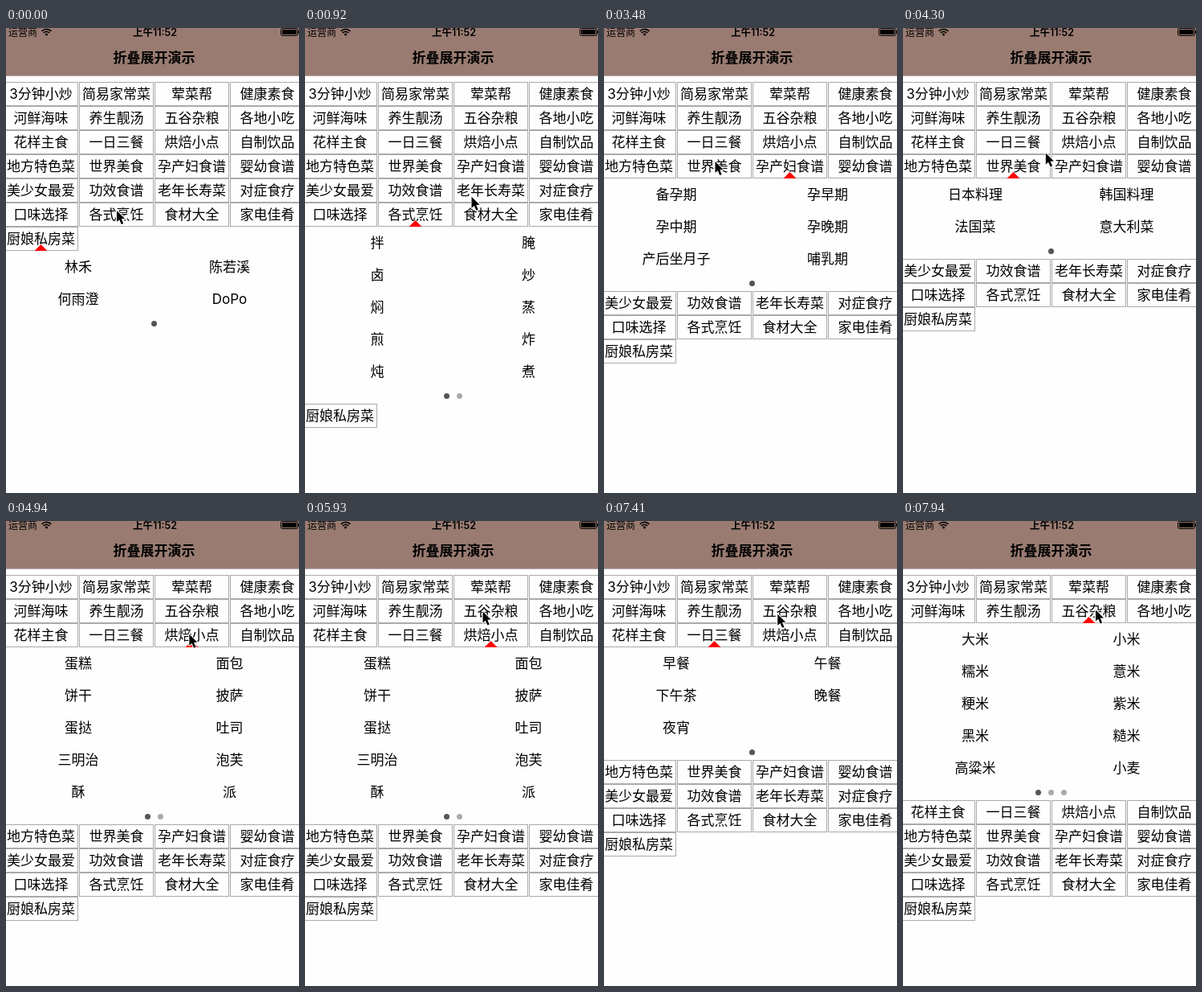
Recreate the animation shown at these times as an HTML page with a canvas. Size 365 px wide and 578 px high, loop 8 s.

```html
<!DOCTYPE html>
<html lang="zh-CN">
<head>
<meta charset="utf-8">
<title>折叠展开演示</title>
<style>
  html, body { margin: 0; width: 100%; height: 100%; overflow: hidden; background: #fefefe; }
  canvas { display: block; }
</style>
</head>
<body>
<canvas id="stage" width="365" height="578"></canvas>
<script>
const ctx = document.getElementById('stage').getContext('2d');
const LOOP = 8000, WIDTH = 365, HEIGHT = 578;
const FONT = 'Inter, "Noto Sans CJK SC", "Noto Sans CJK", sans-serif';
const COLUMNS = 4, PITCH = 94, FIRST_CENTER = 43.5, MIDDLE = 184.5;
const TOP = 67, ROW = 30, SUB_ROW = 40, DOTS = 20;
const BAR = '#997b71', INK = '#000';

const categories = `3分钟小炒 简易家常菜 荤菜帮 健康素食
河鲜海味 养生靓汤 五谷杂粮 各地小吃
花样主食 一日三餐 烘焙小点 自制饮品
地方特色菜 世界美食 孕产妇食谱 婴幼食谱
美少女最爱 功效食谱 老年长寿菜 对症食疗
口味选择 各式烹饪 食材大全 家电佳肴
厨娘私房菜`.split(/\s+/);

// Which category is unfolded from a given time on
const panels = [
  { at: 0, open: '厨娘私房菜', pages: 1, items: '林禾 陈若溪 何雨澄 DoPo' },
  { at: 270, open: '各式烹饪', pages: 2, items: '拌 腌 卤 炒 焖 蒸 煎 炸 炖 煮' },
  { at: 1910, open: '老年长寿菜', pages: 1, items: '延年益寿 清心安神 强筋健骨 增强免疫力 健胃消食 调节三高' },
  { at: 2840, open: '孕产妇食谱', pages: 1, items: '备孕期 孕早期 孕中期 孕晚期 产后坐月子 哺乳期' },
  { at: 3710, open: '世界美食', pages: 1, items: '日本料理 韩国料理 法国菜 意大利菜' },
  { at: 4940, open: '烘焙小点', pages: 2, items: '蛋糕 面包 饼干 披萨 蛋挞 吐司 三明治 泡芙 酥 派' },
  { at: 7120, open: '一日三餐', pages: 1, items: '早餐 午餐 下午茶 晚餐 夜宵' },
  { at: 7940, open: '五谷杂粮', pages: 3, items: '大米 小米 糯米 薏米 粳米 紫米 黑米 糙米 高粱米 小麦' },
].map(p => ({ ...p, items: p.items.split(' '), index: categories.indexOf(p.open) }));

// The pointer eases to each stop and rests there
const home = { x: 138, y: 227 };
const moves = [
  { from: 460, to: 1090, x: 222.5, y: 206 },
  { from: 1210, to: 1680, x: 227, y: 204 },
  { from: 1860, to: 2200, x: 229.5, y: 156.5 },
  { from: 2330, to: 2600, x: 227.5, y: 175 },
  { from: 2790, to: 3480, x: 138.5, y: 166 },
  { from: 4020, to: 4640, x: 230, y: 141.5 },
  { from: 4890, to: 5050, x: 223, y: 138.5 },
  { from: 5420, to: 5620, x: 215, y: 153 },
  { from: 5620, to: 5990, x: 222, y: 109.5 },
  { from: 6240, to: 6820, x: 147.5, y: 131 },
  { from: 7070, to: 7580, x: 240, y: 110.5 },
];

const clamp = v => Math.min(1, Math.max(0, v));
const ease = k => k * k * (3 - 2 * k);

function pointerAt(t) {
  return moves.reduce((p, move) => {
    const k = ease(clamp((t - move.from) / (move.to - move.from)));
    return { x: p.x + (move.x - p.x) * k, y: p.y + (move.y - p.y) * k };
  }, home);
}

function label(text, x, baseline, style = '17px', align = 'center') {
  ctx.font = `${style} ${FONT}`;
  ctx.textAlign = align;
  ctx.fillStyle = INK;
  ctx.fillText(text, x, baseline);
}

function disc(x, y, radius, color) {
  ctx.fillStyle = color;
  ctx.beginPath();
  ctx.arc(x, y, radius, 0, 2 * Math.PI);
  ctx.fill();
}

function polygon(points) {
  ctx.beginPath();
  points.forEach(([x, y]) => ctx.lineTo(x, y));
  ctx.closePath();
}

function drawWifi(x, y) {
  ctx.strokeStyle = INK;
  ctx.lineWidth = 1.7;
  for (const radius of [8, 5]) {
    ctx.beginPath();
    ctx.arc(x, y, radius, -Math.PI * 0.76, -Math.PI * 0.24);
    ctx.stroke();
  }
  disc(x, y - 1.5, 1.5, INK);
}

function drawBattery(x, bottom) {
  ctx.strokeStyle = ctx.fillStyle = INK;
  ctx.lineWidth = 1;
  ctx.beginPath();
  ctx.roundRect(x + 0.5, bottom - 9.5, 21, 9, 2);
  ctx.stroke();
  ctx.fillRect(x + 2, bottom - 8, 18, 6);
  ctx.fillRect(x + 22, bottom - 6.5, 1, 3);
}

function drawHeader() {
  ctx.fillStyle = BAR;
  ctx.fillRect(0, 0, WIDTH, 59);
  ctx.fillStyle = '#b0acaa';
  ctx.fillRect(0, 59, WIDTH, 1);
  label('运营商', 3, 10, '12px', 'left');
  label('上午11:52', 185.5, 10, '600 12.5px');
  label('折叠展开演示', MIDDLE, 43, '600 17px');
  drawWifi(50.5, 9.5);
  drawBattery(342, 10);
}

const centerOf = index => FIRST_CENTER + (index % COLUMNS) * PITCH;
const rowOf = index => Math.floor(index / COLUMNS);

function drawCategories(openRow, panelHeight) {
  ctx.strokeStyle = '#aaa';
  ctx.lineWidth = 1;
  categories.forEach((name, i) => {
    const x = centerOf(i);
    const y = TOP + rowOf(i) * ROW + (rowOf(i) > openRow ? panelHeight : 0);
    ctx.strokeRect(x - 46, y + 0.5, 92, ROW - 1);
    label(name, x, y + 21);
  });
}

function drawPanel(panel, top, height) {
  panel.items.forEach((name, i) =>
    label(name, i % 2 ? 278.5 : 90, top + Math.floor(i / 2) * SUB_ROW + 26));

  for (let i = 0; i < panel.pages; i++) {
    const x = MIDDLE + (i - (panel.pages - 1) / 2) * 16;
    disc(x, top + height - DOTS / 2 + 0.5, 3.5, i ? '#aaa' : '#555');
  }

  const x = centerOf(panel.index);
  ctx.fillStyle = '#f00';
  polygon([[x, top - 8], [x + 8, top], [x - 8, top]]);
  ctx.fill();
}

function drawPointer({ x, y }) {
  ctx.save();
  ctx.translate(x, y);
  polygon([[0, 0], [0, 14], [3.2, 11.2], [5.8, 17], [8.2, 16], [5.7, 10.3], [10, 10]]);
  ctx.lineJoin = 'round';
  ctx.lineWidth = 2;
  ctx.strokeStyle = '#fff';
  ctx.stroke();
  ctx.fillStyle = INK;
  ctx.fill();
  ctx.restore();
}

function draw(t) {
  const panel = panels.findLast(p => p.at <= t);
  const openRow = rowOf(panel.index);
  const height = Math.ceil(panel.items.length / 2) * SUB_ROW + DOTS;

  ctx.fillStyle = '#fefefe';
  ctx.fillRect(0, 0, WIDTH, HEIGHT);
  drawHeader();
  drawCategories(openRow, height);
  drawPanel(panel, TOP + (openRow + 1) * ROW, height);
  drawPointer(pointerAt(t));
}

const start = performance.now();
function tick() {
  draw((performance.now() - start) % LOOP);
  requestAnimationFrame(tick);
}
tick();
</script>
</body>
</html>
```
